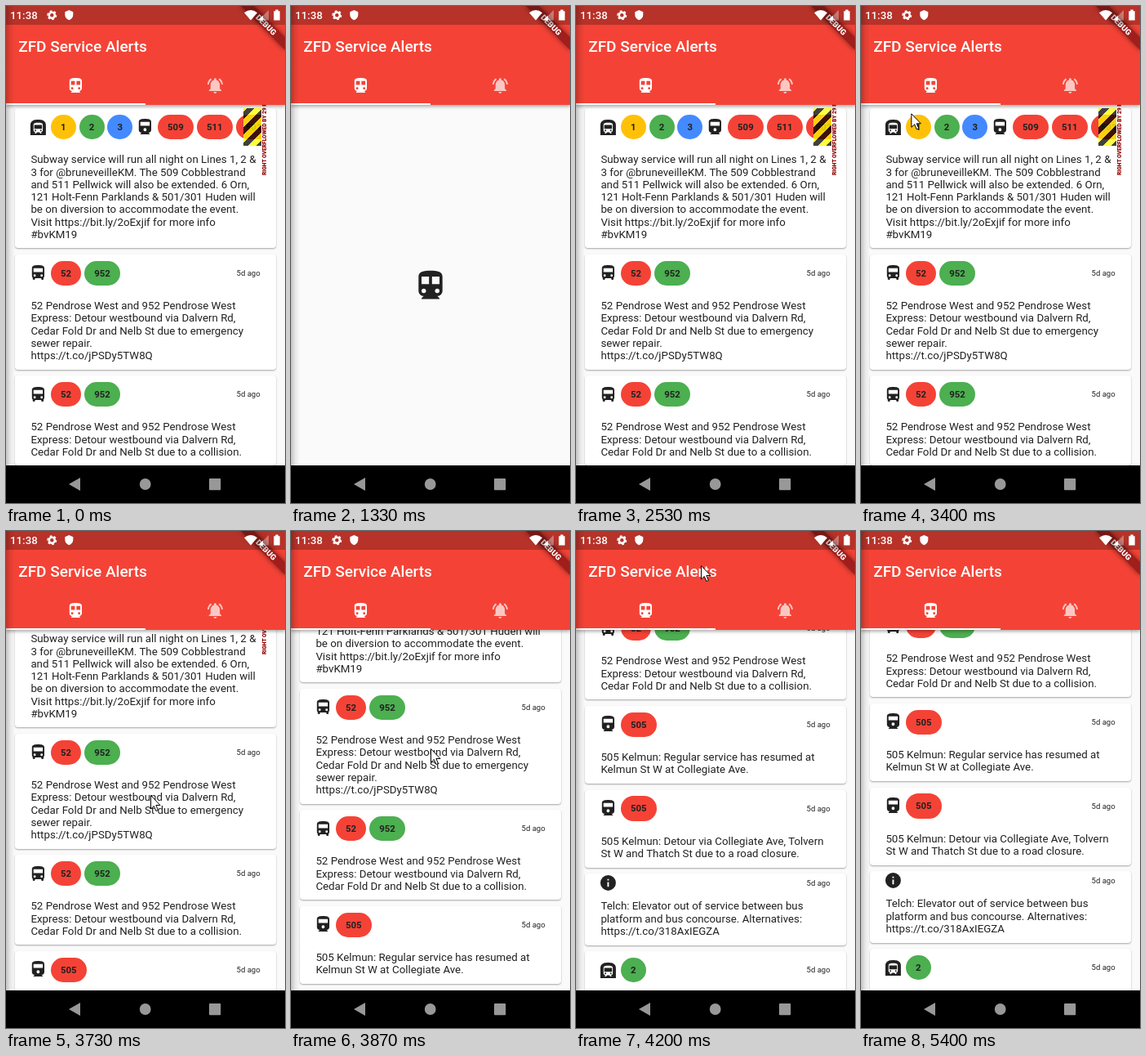
Recreate the animation shown at these times as an HTML page. Size 342 by 608 pixels, loop 6.6 s.

```html
<!DOCTYPE html>
<html lang="en">
<head>
<meta charset="utf-8">
<title>Service Alerts</title>
<style>
  html, body { margin: 0; width: 100%; height: 100%; overflow: hidden; }
  body { background: #fafafa; font: 13.3px/15.2px Roboto, sans-serif; color: #212121; }
  svg { display: block; flex: none; fill: currentColor; fill-rule: evenodd; overflow: visible; }
  #stage { position: relative; width: 342px; height: 608px; overflow: hidden; background: #fafafa; }
  #stage > * { position: absolute; }
  #bar {
    left: 0; top: 0; width: 342px; height: 121px; color: #fff; background: #f44336;
    box-shadow: 0 2px 4px rgba(0, 0, 0, .32);
  }
  #bar > * { position: absolute; }
  #status { left: 0; top: 0; width: 342px; height: 22.8px; background: rgba(0, 0, 0, .25); color: #fff; }
  #clock { position: absolute; left: 5px; top: 4px; font-weight: 500; }
  #title { left: 15.2px; top: 38px; font-size: 19px; line-height: 24px; font-weight: 500; white-space: nowrap; }
  #tab1 { left: 74px; top: 86px; }
  #tab2 { left: 245px; top: 86px; opacity: .7; }
  #line { left: 0; bottom: 0; width: 171px; height: 2px; background: #fff; }
  #body { left: 0; top: 121px; width: 342px; height: 441px; overflow: hidden; }
  #list { position: absolute; left: 11.4px; top: 4.4px; width: 319.2px; }
  .card {
    position: relative; margin-bottom: 7.6px; background: #fff; border-radius: 3.8px;
    box-shadow: 0 1px 2px rgba(0, 0, 0, .34);
  }
  .row {
    display: flex; align-items: center; gap: 3.9px; height: 45.6px;
    padding-left: 16.7px; margin-right: 17.6px; overflow: hidden;
  }
  .info .row { height: 22.8px; }
  .pill {
    flex: none; padding: 0 12.2px; border-radius: 16px;
    font-size: 11.4px; font-weight: 700; line-height: 30.6px;
  }
  .ago { position: absolute; right: 19px; font-size: 9.5px; }
  .text { padding: 9.5px 19px; white-space: pre; }
  .stripes {
    --dark: rgba(0, 0, 0, .75); --light: rgba(255, 255, 0, .75);
    position: absolute; left: 279.6px; top: 0; width: 22px; height: 45.6px;
    background: repeating-linear-gradient(135deg, var(--light) 0 3.15px,
      var(--dark) 3.15px 9.87px, var(--light) 9.87px 13.43px);
  }
  .over {
    position: absolute; left: 306px; top: 81.6px; transform: rotate(-90deg); transform-origin: 0 0;
    font-size: 6.65px; font-weight: 900; line-height: 0; color: #900000; white-space: nowrap;
  }
  #spin { left: 149px; top: 320px; }
  #edge {
    left: 0; top: 0; width: 11px; height: 562px;
    background: linear-gradient(90deg, rgba(0, 0, 0, .22), rgba(0, 0, 0, .07) 50%, transparent);
  }
  #debug { left: 342px; top: 0; width: 0; height: 0; transform: rotate(45deg); }
  #debug span {
    position: absolute; left: -38px; top: 26.6px; width: 76px; height: 11.4px;
    background: #a01e1c; box-shadow: 0 0 6px rgba(0, 0, 0, .5);
    color: #fff; font-size: 9.7px; line-height: 11.4px; font-weight: 900; text-align: center;
  }
  #nav { left: 0; top: 562px; background: #000; color: #989898; }
  #cursor { left: 0; top: 0; }
</style>
</head>
<body>
<div id="stage">
  <div id="body"><div id="list"></div></div>
  <div id="spin"></div>
  <div id="bar">
    <div id="title">ZFD Service Alerts</div>
    <div id="tab1"></div>
    <div id="tab2"></div>
    <div id="line"></div>
  </div>
  <div id="debug"><span>DEBUG</span></div>
  <div id="status">
    <span id="clock">11:38</span>
    <svg width="342" height="22">
      <g fill="none" stroke="#fff">
        <circle cx="56.3" cy="11.3" r="3.5" stroke-width="2.5"/>
        <circle cx="56.3" cy="11.3" r="5" stroke-width="2" pathLength="12" stroke-dasharray="1 1"/>
      </g>
      <path d="M77.3 5l-5 2.3v3.4c0 3.1 2.1 5.7 5 6.6 2.9-.9 5-3.500 5-6.600V7.300z"/>
      <path d="M292 8.200Q300 1.600 308 8.200L300 17.600Z"/>
      <path d="M309.500 17.500L322 5V17.500Z" opacity=".35"/>
      <path d="M315 17.500V11.500L309.500 17.500Z"/>
      <path d="M328.300 6.200h2V4.600h3.400v1.600h2v11.300h-7.400z"/>
    </svg>
  </div>
  <svg id="nav" width="342" height="46">
    <path d="M77 23L91 15V31Z"/>
    <circle cx="170.700" cy="23" r="6.900"/>
    <rect x="249" y="16" width="14.200" height="14.200" rx="1"/>
  </svg>
  <div id="edge"></div>
  <svg id="cursor" width="13" height="21">
    <path d="M.5 .5V17L4.300 13.500L6.900 19.500L9.400 18.400L6.900 12.500H12Z" fill="#fff" stroke="#000"/>
  </svg>
</div>
<script>
const $ = id => document.getElementById(id);

const dot = (x, y, r) => `M${x} ${y - r}a${r} ${r} 0 1 0 0 ${2 * r} ${r} ${r} 0 1 0 0 ${-2 * r}z`;
const wheels = dot(7.5, 15.5, 1.5) + dot(16.5, 15.5, 1.5);

const icons = {
  metro: 'M12 2c-4.42 0-8 .5-8 4v9.5C4 17.43 5.57 19 7.5 19L6 20.5v.5h12v-.5L16.5 19c1.93 0 3.5-1.57 3.5-3.5V6c0-3.5-3.58-4-8-4z' +
    wheels + 'M11 11H6V6h5zM18 11h-5V6h5z',
  bus: 'M4 16c0 .88.39 1.67 1 2.22V20c0 .55.45 1 1 1h1c.55 0 1-.45 1-1v-1h8v1c0 .55.45 1 1 1h1c.55 0 1-.45 1-1v-1.78c.61-.55 1-1.34 1-2.22V6c0-3.5-3.58-4-8-4s-8 .5-8 4z' +
    wheels + 'M18 11H6V6h12z',
  station: 'M17.8 2.8C16 2.09 13.86 2 12 2c-1.86 0-4 .09-5.8.8C3.53 3.84 2 6.05 2 8.86V22h20V8.86c0-2.81-1.53-5.02-4.2-6.06z' +
    'M18 15.88c0 1.45-1.18 2.62-2.63 2.62l1.13 1.12V20H15l-1.5-1.5h-2.83L9.17 20H7.5v-.38l1.12-1.12C7.18 18.5 6 17.32 6 15.88V9c0-2.63 3-3 6-3 3.32 0 6 .38 6 3z' +
    dot(8.5, 16, 1) + dot(15.5, 16, 1) + 'M7 9h10v5H7z',
  rail: 'M4 15.5C4 17.43 5.57 19 7.5 19L6 20.5v.5h12v-.5L16.5 19c1.93 0 3.5-1.57 3.5-3.5V5c0-3.5-3.58-4-8-4s-8 .5-8 4z' +
    dot(12, 15, 2) + 'M18 10H6V5h12z',
  info: dot(12, 12, 10) + 'M13 17h-2v-6h2zM13 9h-2V7h2z',
  bell: 'M7.58 4.08L6.15 2.65C3.75 4.48 2.17 7.3 2.03 10.5h2c.15-2.65 1.51-4.97 3.55-6.42z' +
    'M19.97 10.5h2c-.15-3.2-1.73-6.02-4.12-7.85l-1.42 1.43c2.02 1.45 3.39 3.77 3.54 6.42z' +
    'M18 11c0-3.07-1.64-5.64-4.5-6.32V4c0-.83-.67-1.5-1.5-1.5s-1.5.67-1.5 1.5v.68C7.63 5.36 6 7.92 6 11v5l-2 2v1h16v-1l-2-2z' +
    'M12 22c1.1 0 2-.9 2-2h-4c0 1.1.9 2 2 2z'
};
const icon = (name, size = 22.8) =>
  `<svg width="${size}" height="${size}" viewBox="0 0 24 24"><path d="${icons[name]}"/></svg>`;

const red = '#f44336', green = '#4caf50', amber = '#ffc107', blue = '#448aff';
const pill = (label, color) => `<span class="pill" style="background:${color}">${label}</span>`;
const ago = '<span class="ago">5d ago</span>';
const card = (row, text, extra = '', kind = '') =>
  `<div class="card ${kind}"><div class="row">${row}</div><div class="text">${text}</div>${extra}</div>`;

const busRow = icon('bus') + pill(52, red) + pill(952, green) + ago;
const railRow = icon('rail') + pill(505, red) + ago;
const detour = `52 Pendrose West and 952 Pendrose West
Express: Detour westbound via Dalvern Rd,
Cedar Fold Dr and Nelb St due to `;

$('list').innerHTML = [
  card(icon('station') + pill(1, amber) + pill(2, green) + pill(3, blue) +
    icon('rail') + pill(509, red) + pill(511, red) + pill(501, red),
`Subway service will run all night on Lines 1, 2 &amp;
3 for @bruneveilleKM. The 509 Cobblestrand
and 511 Pellwick will also be extended. 6 Orn,
121 Holt-Fenn Parklands &amp; 501/301 Huden will
be on diversion to accommodate the event.
Visit https://bit.ly/2oExjif for more info
#bvKM19`,
    '<div class="stripes"></div><div class="over">RIGHT OVERFLOWED BY 29 PIXELS</div>'),
  card(busRow, detour + 'emergency\nsewer repair.\nhttps://t.co/jPSDy5TW8Q'),
  card(busRow, detour + 'a collision.'),
  card(railRow, '505 Kelmun: Regular service has resumed at\nKelmun St W at Collegiate Ave.'),
  card(railRow, '505 Kelmun: Detour via Collegiate Ave, Tolvern\nSt W and Thatch St due to a road closure.'),
  card(icon('info') + ago,
    'Telch: Elevator out of service between bus\nplatform and bus concourse. Alternatives:\nhttps://t.co/318AxIEGZA', '', 'info'),
  card(icon('station') + pill(2, green) + ago, ' ')
].join('');
$('tab1').innerHTML = icon('metro');
$('tab2').innerHTML = icon('bell');
$('spin').innerHTML = icon('metro', 44);

// Keys are [tick, value]; the screen updates 15 times a second.
const LOOP = 6600, RATE = 15;
const LOAD = 20, LOADED = 38, TOUCH = 50, SETTLE = 81;
const scrollKeys = [[53, 0], [54, 12], [56, 56], [58, 111], [60, 196], [63, 356]];
const xKeys = [[50, 0], [53, 184], [56, 177], [58, 171], [63, 153]];
const yKeys = [[50, 0], [53, 394], [56, 323], [58, 266], [60, 180], [63, 42]];

function at(keys, k) {
  if (k <= keys[0][0]) return keys[0][1];
  for (let i = 1; i < keys.length; i++) {
    const [a, u] = keys[i - 1], [b, v] = keys[i];
    if (k <= b) return u + (v - u) * (k - a) / (b - a);
  }
  return keys[keys.length - 1][1];
}

function draw(ms) {
  const k = Math.floor((ms % LOOP + 4) * RATE / 1000);
  const loading = k >= LOAD && k < LOADED;
  const scroll = k >= SETTLE ? 359 : at(scrollKeys, k);
  $('list').style.visibility = loading ? 'hidden' : 'visible';
  $('list').style.transform = `translateY(${-scroll}px)`;

  const p = Math.min(Math.max((k - LOAD) / 14, 0), 1);
  const turn = 180 * (1 - Math.cos(Math.PI * p));
  $('spin').style.visibility = loading ? 'visible' : 'hidden';
  $('spin').style.transform = `rotate(${turn}deg) scale(${1 + .2 * Math.sin(Math.PI * p)})`;

  $('cursor').style.visibility = k >= TOUCH && k < SETTLE ? 'visible' : 'hidden';
  $('cursor').style.transform = `translate(${at(xKeys, k)}px, ${at(yKeys, k)}px)`;
}

const start = performance.now();
function tick() {
  draw(performance.now() - start);
  requestAnimationFrame(tick);
}
tick();
</script>
</body>
</html>
```
